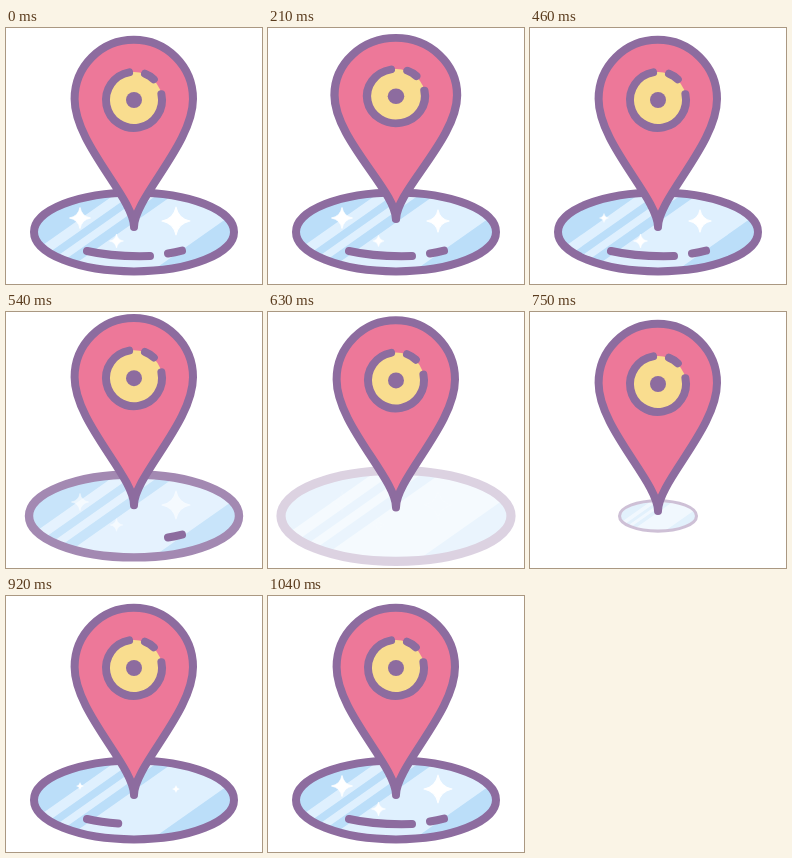
An HTML page that plays this animation: 256 px wide and 256 px high, repeating every 1.18 s.

```html
<!DOCTYPE html>
<html lang="en">
<head>
<meta charset="utf-8">
<title>Map pin</title>
<style>
  html, body { margin: 0; width: 100%; height: 100%; overflow: hidden; background: #fff; }
  svg { display: block; width: 100%; height: 100%; }
  .line { fill: none; stroke: #8d6c9f; stroke-width: 8; stroke-linecap: round; stroke-linejoin: round; }
  .dark { fill: #bbdef9; }
  .dot { fill: #8d6c9f; }
</style>
</head>
<body>
<svg viewBox="0 0 256 256">
  <defs>
    <clipPath id="rim"><ellipse cx="128" cy="203.9" rx="100" ry="39.5"/></clipPath>
    <path id="star" d="M0-1Q.16-.16 1 0Q.16 .16 0 1Q-.16 .16-1 0Q-.16-.16 0-1Z" fill="#fff" stroke="#fff" stroke-width=".08" stroke-linejoin="round"/>
  </defs>

  <g id="disc">
    <ellipse cx="128" cy="203.9" rx="100" ry="39.5" fill="#dff0fe"/>
    <g class="dark" clip-path="url(#rim)">
      <path d="M0 160H118L-10 250H-20Z"/>
      <path d="M135 160H148L20 250H7Z"/>
      <path d="M161 160H177L49 250H33Z"/>
      <path d="M264 160H300V250H136Z"/>
    </g>
    <ellipse class="line" cx="128" cy="203.9" rx="100" ry="39.5"/>
  </g>

  <g id="stars">
    <use href="#star"/>
    <use href="#star"/>
    <use href="#star"/>
  </g>

  <path id="long" class="line" pathLength="1" d="M81 223Q107 229 144 228"/>
  <path id="short" class="line" pathLength="1" d="M162 225.5Q169 224.5 176 222.7"/>

  <g id="pin">
    <path class="line" style="fill:#ed7899" d="M128 199C128 170 68.6 116 68.6 71A59.2 59.2 0 0 1 187 71C187 116 128 170 128 199Z"/>
    <circle cx="128" cy="72" r="28" fill="#f9dd8f"/>
    <path class="line" d="M155.4 66.2A28 28 0 1 1 123.1 44.4M139 45.7Q144 47.6 147.8 51.3"/>
    <circle class="dot" cx="128" cy="72" r="8"/>
  </g>
</svg>

<script>
  const LOOP = 1180, FPS = 24;
  const $ = id => document.getElementById(id);
  const stars = [...$('stars').children];

  // Linear interpolation through [frame, value] pairs
  function track(f, keys) {
    if (f <= keys[0][0]) return keys[0][1];
    for (let i = 1; i < keys.length; i++) {
      const [a, u] = keys[i - 1], [b, v] = keys[i];
      if (f <= b) return u + (v - u) * (f - a) / (b - a);
    }
    return keys[keys.length - 1][1];
  }

  const hump = (f, from, to) =>
    f > from && f < to ? Math.sin(Math.PI * (f - from) / (to - from)) : 0;

  const sparkles = [
    { x: 74, y: 190, r: 10.5, keys: [[7, 1], [10, .25], [14, 1], [16, 1], [17, 0], [21, 0], [24, 1]] },
    { x: 110.5, y: 213, r: 7, keys: [[4, 1], [7.5, .33], [11, 1], [13, .9], [16, .9], [17, 0], [22, 0], [25, 1]] },
    { x: 170, y: 193, r: 14, keys: [[4, 1], [8, .23], [12, 1], [16, 1], [17, 0], [21, 0], [25, 1]] }
  ];

  // Shows the part of a stroke between two fractions of its length
  function trim(el, start, end) {
    const len = end - start;
    el.style.visibility = len > .001 ? 'visible' : 'hidden';
    el.style.strokeDasharray = len > .999 ? 'none' : `${len} 2`;
    el.style.strokeDashoffset = -start;
  }

  function trimCycle(el, f, out, back) {
    if (f < 17) trim(el, track(f, [[out[0], 0], [out[1], 1]]), 1);
    else trim(el, 0, track(f, [[back[0], 0], [back[1], 1]]));
  }

  function scaleAt(x, y, sx, sy, dy = 0) {
    return `translate(${x} ${y + dy}) scale(${sx} ${sy}) translate(${-x} ${-y})`;
  }

  function draw(f) {
    const squash = hump(f, 4, 11) / .975, lift = hump(f, 11, 16);
    $('pin').setAttribute('transform',
      scaleAt(128, 105.5, 1 + .08 * squash, 1 - .072 * squash, -11 * squash - 6.1 * lift));

    const leaving = f < 17;
    const size = leaving
      ? track(f, [[12, 1], [16, 1.2]])
      : track(f, [[16, 0], [20, .77], [21, .95], [22, 1]]);
    const fade = leaving
      ? track(f, [[12, 1], [13, .8], [15, .3], [16, .03]])
      : track(f, [[16, 0], [20, .84], [21, 1]]);
    $('disc').setAttribute('transform', scaleAt(128, 203.9, size, size));
    $('disc').setAttribute('opacity', fade);

    $('stars').setAttribute('opacity', fade * fade);
    sparkles.forEach(({ x, y, r, keys }, i) =>
      stars[i].setAttribute('transform', `translate(${x} ${y}) scale(${r * track(f, keys)})`));

    trimCycle($('long'), f, [11, 13], [20, 24]);
    trimCycle($('short'), f, [13, 15], [23, 25]);
  }

  const start = performance.now();
  function tick() {
    const t = (performance.now() - start) % LOOP;
    draw(Math.floor((t + 4) * FPS / 1000));
    requestAnimationFrame(tick);
  }
  tick();
</script>
</body>
</html>
```
